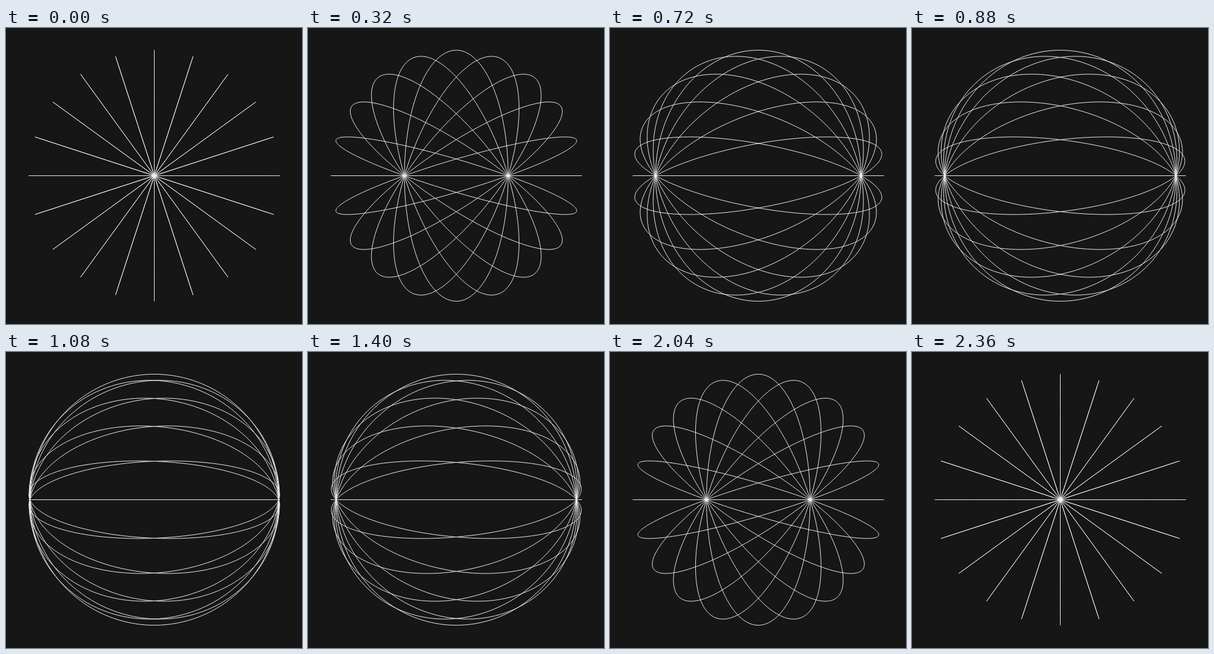
Animation, 500 px wide and 500 px high, one loop 2400 ms. Source, as an HTML page with a canvas:

```html
<!DOCTYPE html>
<html lang="en">
<head>
<meta charset="utf-8">
<title>Turning great circles</title>
<style>
html, body { margin: 0; width: 100%; height: 100%; overflow: hidden; background: #161616; }
canvas { display: block; }
</style>
</head>
<body>
<canvas id="stage" width="500" height="500"></canvas>
<script>
const ctx = document.getElementById('stage').getContext('2d');
const CX = 250.5, CY = 249.5, R = 212;
const CIRCLES = 10, SEGMENTS = 240;
const STEP = 40, STEPS = 60;

// Great circle tilted by `tilt`, turned by `turn` about the vertical axis, seen from the front.
function circle(tilt, turn) {
  const a = R * Math.cos(tilt) * Math.cos(turn);
  const b = R * Math.sin(turn);
  const h = R * Math.sin(tilt);
  ctx.beginPath();
  for (let i = 0; i < SEGMENTS; i++) {
    const t = i / SEGMENTS * 2 * Math.PI;
    ctx.lineTo(CX + a * Math.sin(t) + b * Math.cos(t), CY - h * Math.sin(t));
  }
  ctx.closePath();
  ctx.stroke();
}

function draw(now) {
  const step = Math.floor(now / STEP) % STEPS;
  const turn = Math.PI * step / (STEPS - 1);
  ctx.fillStyle = '#161616';
  ctx.fillRect(0, 0, 500, 500);
  ctx.strokeStyle = '#f0f0f0';
  ctx.lineWidth = 1;
  ctx.lineJoin = 'round';
  for (let k = 0; k < CIRCLES; k++) circle(k * Math.PI / CIRCLES, turn);
}

function loop() {
  draw(performance.now());
  requestAnimationFrame(loop);
}
loop();
</script>
</body>
</html>
```
